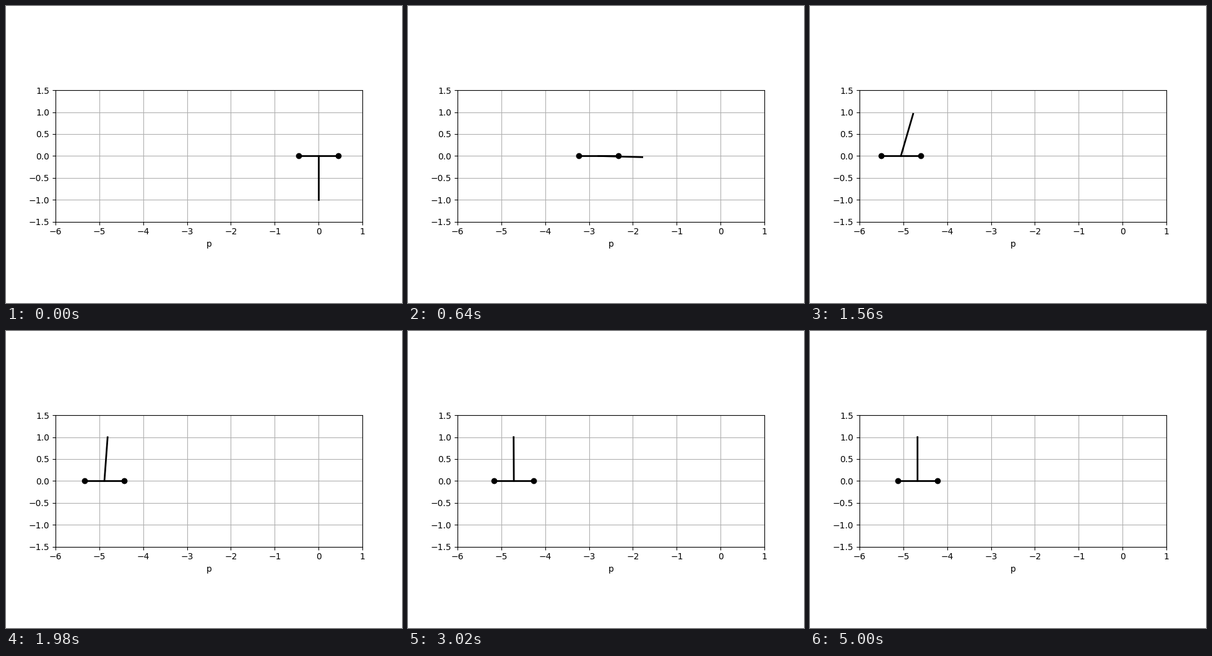
Write a matplotlib script that moves like this. It is 640 by 480 pixels and loops after 5.02 s.

```python
import numpy as np
import matplotlib.pyplot as plt
from matplotlib.animation import FuncAnimation

FRAMES, STEP = 251, 20     # 5020 ms per loop
HALF, LENGTH = 0.45, 1.0   # half width of the cart, pole length
PUSH, BRAKE = 13.704, 13.28  # cart acceleration, first left, then right
SWITCH, CATCH = 0.6, 1.1   # times when braking and balancing begin
SLOW = 1.284               # rate of the final drift


def settle(s, drift, rate, *poly):
    """Slow drift plus a faster transient, both dying out with s."""
    fast = sum(c * s ** n for n, c in enumerate(poly))
    return drift * np.exp(-SLOW * s) + fast * np.exp(-rate * s)


def cart_at(t):
    if t < CATCH:
        s = max(t - SWITCH, 0)
        return -PUSH * t ** 2 / 2 + (PUSH + BRAKE) * s ** 2 / 2
    return -4.6734 + settle(t - CATCH, -0.458, 4.5, 0.2137, -1.208, -3.2)


def angle_at(t):
    """Pole angle, measured from hanging straight down."""
    if t < SWITCH:
        return 1.107 * (1 - np.cos(3.1 * t))
    return np.pi - settle(t - SWITCH, -0.183, 4.8, 1.902, 5.61, 11.6, 17.8)


fig = plt.figure(figsize=(6.4, 4.8), dpi=100)
ax = fig.add_subplot(xlim=(-6, 1), ylim=(-1.5, 1.5), aspect="equal")
ax.set_xlabel("p")
ax.grid()
cart, = ax.plot([], [], "ko-", lw=2)
pole, = ax.plot([], [], "k-", lw=2)


def update(i):
    t = i * STEP / 1000
    p, theta = cart_at(t), angle_at(t)
    cart.set_data([p - HALF, p + HALF], [0, 0])
    pole.set_data([p, p + LENGTH * np.sin(theta)],
                  [0, -LENGTH * np.cos(theta)])
    return cart, pole


anim = FuncAnimation(fig, update, frames=FRAMES, interval=STEP, repeat=True)
plt.show()
```
